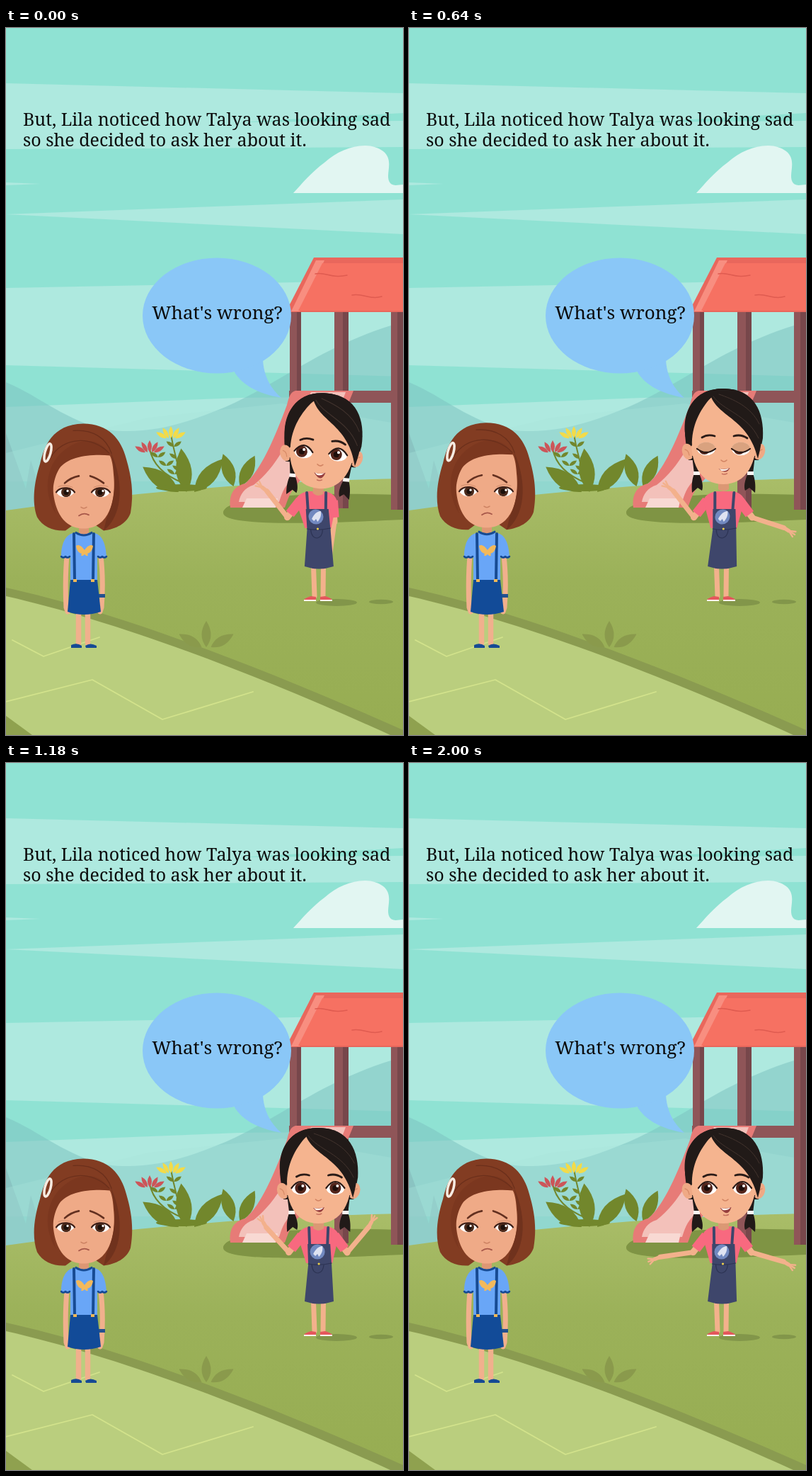
Write an HTML page that moves like this. It is 561 px wide and 998 px high and loops after 2.03 s.

```html
<!DOCTYPE html>
<html lang="en">
<head>
<meta charset="utf-8">
<title>What's wrong?</title>
<style>
html, body { margin: 0; width: 100%; height: 100%; overflow: hidden; background: #8fe2d3; }
svg { display: block; width: 100%; height: 100%; }
text { font-family: "Noto Serif", serif; font-size: 25px; fill: #0b0b0b; }
.line { fill: none; stroke-linecap: round; stroke-linejoin: round; }
</style>
</head>
<body>
<svg viewBox="0 0 561 998">
<defs>
  <linearGradient id="grass" x2="0" y2="1">
    <stop offset="0" stop-color="#a9bd68"/><stop offset=".4" stop-color="#9bb159"/><stop offset="1" stop-color="#97ad52"/>
  </linearGradient>
  <clipPath id="eyeClip"><ellipse rx="13" ry="9.5"/></clipPath>
  <clipPath id="sadClip"><path d="M-13 0Q-9 -7 2 -6Q10 -5 13 0Q6 7 0 7Q-8 7 -13 0Z"/></clipPath>
</defs>

<!-- sky -->
<rect width="561" height="998" fill="#8fe2d3"/>
<g fill="#aee9df">
  <path d="M0 78L561 92V120L330 133L561 131V168L0 171ZM0 218L48 220L0 222ZM0 263L561 242V291Z"/>
  <path d="M0 367L561 356V492L0 476ZM0 535L330 522L561 520V640H0Z"/>
</g>
<path d="M406 233C418 220 432 203 450 190C475 167 512 158 533 174C550 188 534 208 543 219C548 224 555 221 561 221V233Z" fill="#e2f6f2"/>
<path d="M0 500C50 520 100 568 165 569C220 570 260 555 310 535C390 500 450 445 561 415V690H0Z" fill="#7fc4c2" opacity=".55"/>
<path d="M0 572L28 650L35 610L60 690H0Z" fill="#83b9b8" opacity=".55"/>
<path d="M0 600L200 550L390 530L561 560V690H0Z" fill="#a5e2da" opacity=".35"/>

<!-- ground -->
<path d="M0 681C150 660 330 640 561 636V998H0Z" fill="url(#grass)"/>
<path d="M307 684C310 660 430 655 561 659V694C470 698 305 706 307 684Z" fill="#7f9444"/>
<path d="M0 790C150 823 345 895 561 991V998H0Z" fill="#8a9b50"/>
<path d="M0 802C150 836 340 906 543 998H0Z" fill="#bace7e"/>
<path d="M0 971L37 998H0Z" fill="#8fa14f"/>
<path class="line" d="M9 864L53 887L132 860M0 951L122 920L221 976L349 937" stroke="#d3e38c" stroke-width="1.8"/>
<ellipse cx="467" cy="811" rx="29" ry="5" fill="#82964a"/>
<ellipse cx="530" cy="810" rx="17" ry="3.2" fill="#82964a"/>
<g id="plants"></g>

<!-- playground -->
<path fill="#8f5558" d="M401 400H417V515H401ZM464 400H484V678H464ZM544 400H561V680H544ZM400 512H561V529H400Z"/>
<path fill="#77474b" d="M411 400H417V512H411ZM476 400H484V512H476ZM476 529H484V678H476ZM553 400H561V680H553Z"/>
<path d="M435 324H561V401H399V394Z" fill="#e9675c"/>
<path d="M438 328H450L415 400H403Z" fill="#f88e80"/>
<path d="M447 332H561V399H413Z" fill="#f67162"/>
<path class="line" d="M437 347C452 344 459 354 482 349M489 377C505 374 514 384 531 379" stroke="#df5b50" stroke-width="1.5"/>
<path d="M409 512H491C478 545 455 600 414 641C400 655 398 668 394 677H317C315 661 320 647 338 643C360 625 380 578 397 532C400 520 402 514 409 512Z" fill="#e77b77"/>
<path d="M431 514H480C468 548 440 600 404 637C392 648 389 660 386 669H329C331 658 337 649 350 645C382 620 402 580 418 540Z" fill="#f3c1ba"/>
<path d="M340 664H384L381 677H334Z" fill="#f8d9d3"/>

<!-- words -->
<path d="M322 484C332 503 355 516 389 522C373 508 364 490 363 468Z" fill="#8ac7f7"/>
<ellipse cx="298" cy="406" rx="105" ry="81.5" fill="#8ac7f7"/>
<text x="24" y="138">But, Lila noticed how Talya was looking sad</text>
<text x="24" y="167">so she decided to ask her about it.</text>
<text x="298.5" y="411" text-anchor="middle" style="font-size:26px">What's wrong?</text>

<!-- sad girl -->
<g>
  <path class="line" d="M102.5 825V868M115.500 825V868" stroke="#f1b08d" stroke-width="7.5"/>
  <path d="M92 871Q100 867 107 872V875H92ZM112 872Q119 867 128 872V875H113Z" fill="#164a94"/>
  <path class="line" d="M86 745Q83 780 85 818L87 824M134 745Q138 780 135 818L133 824" stroke="#f1b08d" stroke-width="7"/>
  <path d="M131 799H140V804H131Z" fill="#23518f"/>
  <path d="M96 713H124C134 714 141 725 142 746Q135 750 129 747V780H91V747Q84 750 78 746C78 725 86 714 96 713Z" fill="#69a6f7"/>
  <path class="line" d="M78 746q3 3 6 0q3 3 6 0M130 746q3 3 6 0q3 3 6 0" stroke="#164a94" stroke-width="2.5"/>
  <path d="M91 779H129L134 824Q110 832 87 824Z" fill="#124b98"/>
  <path class="line" d="M96 714L97 780M124 714L123 780" stroke="#174b93" stroke-width="4"/>
  <path d="M95 778h5v4h-5ZM120 778h5v4h-5Z" fill="#f0b757"/>
  <path d="M111 737C106 730 102 729 99 731C100 738 103 741 107 742C105 745 107 747 111 743C115 747 117 745 115 742C119 741 122 738 123 731C120 729 116 730 111 737Z" fill="#f3b95b"/>
  <g id="sadHead">
    <path d="M103 698H117V712Q110 717 103 712Z" fill="#dd9774"/>
    <path class="line" d="M99 712Q110 719 121 712" stroke="#174b93" stroke-width="3"/>
    <path d="M109 558C65 559 54 590 48 615C40 640 36 668 44 690C52 704 68 710 84 709L110 690L138 709C155 707 171 699 176 684C181 655 177 632 170 608C163 580 145 558 109 558Z" fill="#823c22"/>
    <path d="M67 625C63 665 73 706 110 706C146 706 156 665 152 630C151 615 149 606 146 602C115 601 76 600 67 625Z" fill="#efaa87"/>
    <path d="M147 603C118 601 88 604 75 622C66 637 63 660 71 686C48 650 58 603 98 586C120 578 138 585 147 603Z" fill="#7b371f"/>
    <path d="M148 598C157 635 155 665 142 692L138 709C163 690 169 645 148 598Z" fill="#70321d"/>
    <path class="line" d="M146 600C122 575 82 575 62 607M149 600C142 578 122 566 95 568" stroke="#6b2f1b" stroke-width="1.3"/>
    <ellipse class="line" cx="59" cy="599" rx="4" ry="13" transform="rotate(15 59 599)" stroke="#f6ece2" stroke-width="3.5"/>
    <path class="line" d="M83 642Q92 634 103 632M119 632Q129 635 138 642" stroke="#633020" stroke-width="2.6"/>
    <g id="sadEyes"></g>
    <path class="line" d="M106 676Q110 679 114 676" stroke="#cc8262" stroke-width="1.5"/>
    <path class="line" d="M103 688Q110 683 117 687" stroke="#a7584a" stroke-width="1.8"/>
  </g>
</g>

<!-- asking girl -->
<g>
  <path class="line" d="M434.5 760L436 802M448.5 760L448 802" stroke="#f3b18c" stroke-width="7"/>
  <path d="M421 807Q424 804 431 802L438 803V808H421ZM444 803L451 802Q458 804 461 807V808H444Z" fill="#e4575c"/>
  <path d="M421 807H438V809H421ZM444 807H461V809H444Z" fill="#fff2ee"/>
  <g id="arms"></g>
  <g id="body">
    <path d="M431 654H452C461 655 468 659 470 667L461 706H424L412 667C414 659 422 655 431 654Z" fill="#f8697f"/>
    <path d="M426 679H458L460 708L463 760Q442 767 422 760L427 708Z" fill="#3e466b"/>
    <path class="line" d="M428 656L429 682M455 656L454 682" stroke="#3e466b" stroke-width="4"/>
    <path class="line" d="M427 707Q442 710 460 706M432 708Q433 720 441 720Q448 719 449 708" stroke="#2c3353" stroke-width="1.2"/>
    <circle cx="440" cy="690" r="10.5" fill="#7289c0"/>
    <path d="M447 682C441 682 437 687 434 693L437 696L440 693L442 697C446 693 448 688 447 682Z" fill="#dfe3f2"/>
    <circle cx="442" cy="707" r="1.6" fill="#f0d24c"/>
  </g>
  <g id="head">
    <path d="M434 640H449V657Q441 663 434 657Z" fill="#db9874"/>
    <path d="M388 590C382 545 400 515 441 515C485 515 499 548 497 585L491 616H392Z" fill="#211a18"/>
    <g id="side">
      <ellipse cx="391" cy="604" rx="8" ry="11.5" transform="rotate(-15 391 604)" fill="#efa985"/>
      <path class="line" d="M387 601Q392 602 393 609" stroke="#d88c69" stroke-width="1.3"/>
      <path d="M397 610H410L407 635C412 645 413 654 411 659L405 655L397 662C396 651 397 643 400 635Z" fill="#211a18"/>
      <path d="M399 632H408V637H399Z" fill="#fbf7f4"/>
    </g>
    <use href="#side" transform="matrix(-1 0 0 1 883 0)"/>
    <path d="M396 575C393 620 408 650 441 650C474 650 490 620 488 575C480 545 455 526 425 527C408 540 398 560 396 575Z" fill="#f5b48f"/>
    <path d="M424 527C436 556 477 558 490 614C502 575 500 515 441 515C392 515 380 560 390 590L397 596C396 568 408 545 424 527Z" fill="#211a18"/>
    <path class="line" d="M427 526C440 546 475 551 491 585M435 523C455 530 480 540 492 565" stroke="#43342e"/>
    <g id="face">
      <path class="line" d="M410 584Q418 579 428 582M455 582Q465 579 474 585" stroke="#2a1b17" stroke-width="2.8"/>
      <g id="eyes"></g>
      <path class="line" d="M437 616Q441 620 445 616" stroke="#d28463" stroke-width="1.6"/>
      <g transform="translate(441.5 628)">
        <path id="mouth" fill="#963e3d"/>
        <path d="M-7 0Q0 2 7 -.5Q2 4.5 -4 3Z" fill="#fff6f0"/>
        <path class="line" id="lip" stroke="#c56f5d" stroke-width="1.4"/>
      </g>
    </g>
  </g>
</g>
</svg>

<script>
const LOOP = 2030;
const SKIN = '#f3b18c', SHIRT = '#f8697f', LEAF = '#72872c';
const $ = id => document.getElementById(id);
const all = css => document.querySelectorAll(css);
const attr = (els, name, value) => els.forEach(el => el.setAttribute(name, value));

// smooth step from 0 to 1 between two times, and a rise and fall around one
function ease(t, from, to) {
  const p = Math.min(1, Math.max(0, (t - from) / (to - from)));
  return p * p * (3 - 2 * p);
}
const bump = (t, mid, half) => ease(t, mid - half, mid) - ease(t, mid, mid + half);

const stroke = (d, color, width, cap = 'round') =>
  `<path class="line" d="${d}" stroke="${color}" stroke-width="${width}" style="stroke-linecap:${cap}"/>`;

// plants: every leaf is a spindle from its root, turned from upright
const leaf = (x, y, turn, len, wide, color = LEAF) =>
  `<path transform="translate(${x} ${y}) rotate(${turn})" d="M0 0Q${-wide} ${-len * .45} 0 ${-len}Q${wide} ${-len * .45} 0 0Z" fill="${color}"/>`;

function fan(x, y, count, from, step, len, wide, color) {
  let out = '';
  for (let i = 0; i < count; i++) out += leaf(x + (i - (count - 1) / 2) * wide * .5, y, from + i * step, len, wide, color);
  return out;
}

function flower(x, y, color) {
  let out = stroke(`M${x} ${y}Q${x + 6} ${y + 32} 250 642`, LEAF, 2);
  for (let i = 1; i < 4; i++) {
    const px = x + (250 - x) * i / 4, py = y + (642 - y) * i / 4;
    out += leaf(px, py, 55, 13, 5) + leaf(px, py, -55, 13, 5);
  }
  return out + fan(x, y + 5, 5, -60, 30, 17, 6, color);
}

$('plants').innerHTML = flower(203, 594, '#cc5559') + flower(233, 574, '#f3db48') +
  fan(255, 655, 3, -55, 48, 62, 22) + fan(326, 647, 2, -18, 44, 48, 18) +
  `<ellipse cx="248" cy="649" rx="36" ry="5" fill="${LEAF}"/>` +
  fan(283, 874, 3, -60, 60, 37, 13, '#8a9a4c');

// eyes
$('eyes').innerHTML = [416, 465].map(x => `<g transform="translate(${x} 600)">
  <g clip-path="url(#eyeClip)"><ellipse rx="13" ry="9.5" fill="#fff"/>
    <g class="iris"><circle r="8" fill="#53251b"/><circle r="4" fill="#1d0e0b"/><circle cx="3" cy="-3" r="2" fill="#fff"/></g></g>
  <path class="lid" fill="#d9a27f"/><path class="lash line" stroke="#2a1814" stroke-width="2.2"/></g>`).join('');

$('sadEyes').innerHTML = [1, -1].map(s => `<g transform="translate(${109 - 25 * s} 655) scale(${s} 1)">
  <g clip-path="url(#sadClip)"><rect x="-13" y="-8" width="26" height="16" fill="#fff"/>
    <circle cx="1" r="7" fill="#4d2b1c"/><circle cx="1" r="3.6" fill="#1c100b"/></g>
  <circle cx="${3 * s}" cy="-2" r="1.6" fill="#fff"/>
  <path class="line" d="M-13 0Q-9 -7 2 -6Q10 -5 13 0" stroke="#3d1f17" stroke-width="2.2"/>
  <path class="line" d="M-10 -8Q0 -12 10 -7" stroke="#cf8b6b"/></g>`).join('');

// angles are degrees above the horizontal, side is -1 for the left and 1 for the right
function arm(side, x, upper, raise, wrist) {
  const step = ([px, py], deg, len) => {
    const a = deg * Math.PI / 180;
    return [px + side * Math.cos(a) * len, py - Math.sin(a) * len];
  };
  const link = (a, b, color, width, cap) => stroke(`M${a}L${b}`, color, width, cap);
  const shoulder = [x, 667];
  const elbow = step(shoulder, upper, 30);
  const hand = step(elbow, raise, 47);
  const palm = step(hand, raise + wrist, 8);
  let out = link(shoulder, elbow, SKIN, 9) + link(elbow, hand, SKIN, 7) + link(hand, palm, SKIN, 5.5);
  for (const spread of [-25, 0, 25]) out += link(palm, step(palm, raise + wrist + spread, 10), SKIN, 2.4);
  return out + link(shoulder, step(shoulder, upper, 24), SHIRT, 14, 'butt');
}

function draw(t) {
  const settle = ease(t, 0, 300);    // head straightens
  const lift = ease(t, 300, 620);    // right arm swings out
  const up = ease(t, 640, 910);      // both hands up
  const fall = ease(t, 1060, 1790);  // hands sink to the sides
  const nod = bump(t, 640, 230);
  const blink = Math.min(1, 1.25 * bump(t, 640, 160)) + .75 * bump(t, 1730, 140);

  const wrist = -14 + 28 * (up - fall);
  const lean = -2 * (1 - up) + 5 * nod + 2 * fall;
  $('arms').innerHTML = arm(-1, 418 + lean, -52, 52 - 60 * fall, wrist) +
    arm(1, 464 + lean, -86 + 33 * lift, -98 + 80 * lift + 73 * up - 71 * fall, wrist);

  const slant = lean / 75;
  $('body').setAttribute('transform', `matrix(1 0 ${-slant} 1 ${slant * 764} 0)`);
  $('head').setAttribute('transform', `translate(${3 * (nod + fall)} ${-6 * nod}) rotate(${5 * (1 - settle)} 441 650)`);
  $('face').setAttribute('transform', `translate(${nod + 3 * fall} 0)`);

  const sag = -18 + 28 * blink;
  attr(all('.iris'), 'transform', `translate(${-2.5 * (1 - up) - fall} 0)`);
  attr(all('.lid'), 'd', `M-13 0A13 9.5 0 0 1 13 0Q0 ${sag} -13 0Z`);
  attr(all('.lash'), 'd', `M-13 0Q0 ${sag} 13 0`);

  const low = 15 - 9 * bump(t, 860, 500);
  $('mouth').setAttribute('d', `M-8 0Q0 2 8 -1Q3 ${low} -8 0Z`);
  $('lip').setAttribute('d', `M-3 ${low / 2 + 2.5}q3 1.5 7 -.5`);

  $('sadHead').setAttribute('transform', `translate(0 ${.4 - 1.2 * nod})`);
}

function tick() {
  draw(performance.now() % LOOP);
  requestAnimationFrame(tick);
}
tick();
</script>
</body>
</html>
```
